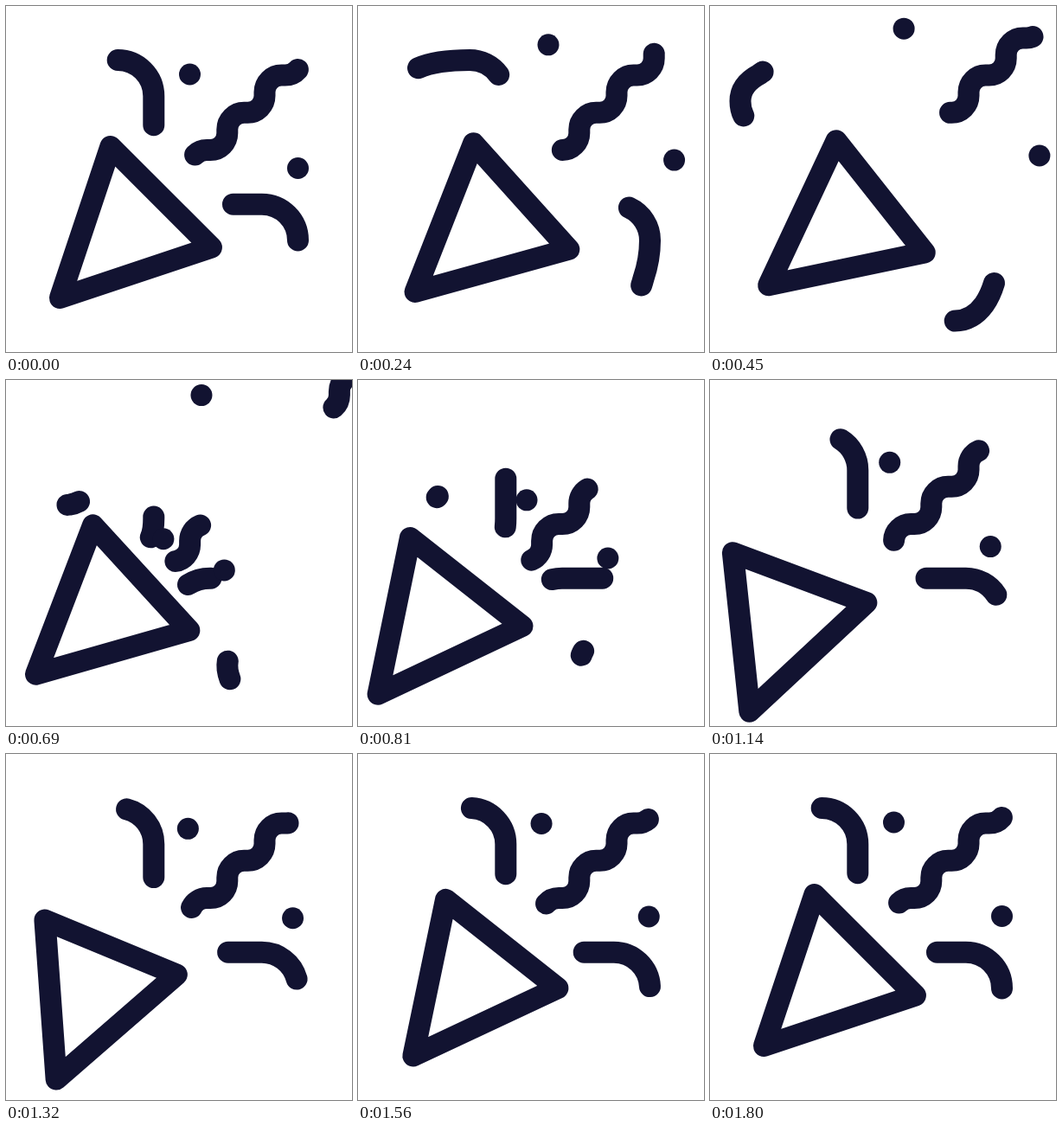
Write an HTML page that moves like this. It is 400x400 px and loops after 3.83 s.

```html
<!DOCTYPE html>
<html lang="en">
<head>
<meta charset="utf-8">
<title>Confetti popper</title>
<style>
  html, body { margin: 0; height: 100%; overflow: hidden; background: #fff; }
  svg { display: block; width: 100vw; height: 100vh; }
  path { fill: none; stroke: #121331; stroke-width: 25; stroke-linecap: round; stroke-linejoin: round; }
  circle { fill: #121331; }
</style>
</head>
<body>
<svg id="stage" viewBox="0 0 400 400">
  <path id="cone" d="M-19.4-97.2 97.2 19.4-77.8 77.8Z"/>
</svg>
<script>
const LOOP = 3830, STEP = 30, FIRE = 630, REST = 1800;
const stage = document.getElementById('stage');
const cone = document.getElementById('cone');

// Easing curves as cubic-bezier control points
const SMOOTH = [1 / 3, 0, 2 / 3, 1];
const GLIDE = [.33, .2, .53, 1];
const CATCH_UP = [1 / 3, 0, .59, 1];
const DART = [.1, .55, .18, 1];
const LAUNCH = [.1, .55, .24, 1];
const UNFURL = [.1, .55, .3, 1];
const TRAIL = [.1, .2, .24, 1];
const SLOW_TRAIL = [.2, 0, .24, 1];
const RETURN = [.59, 0, .48, 1];

const bezier = (u, a, b) => 3 * (1 - u) ** 2 * u * a + 3 * (1 - u) * u * u * b + u ** 3;

function ease(x, [x1, y1, x2, y2]) {
  let low = 0, high = 1;
  for (let i = 0; i < 20; i++) {
    const mid = (low + high) / 2;
    if (bezier(mid, x1, x2) < x) low = mid; else high = mid;
  }
  return bezier((low + high) / 2, y1, y2);
}

// Keys are [time, value, easing towards this key]
function track(t, ...keys) {
  if (t <= keys[0][0]) return keys[0][1];
  for (let i = 1; i < keys.length; i++) {
    const [t0, v0] = keys[i - 1], [t1, v1, curve = SMOOTH] = keys[i];
    if (t < t1) return v0 + (v1 - v0) * ease((t - t0) / (t1 - t0), curve);
  }
  return keys[keys.length - 1][1];
}

function add(tag, attributes) {
  const node = document.createElementNS('http://www.w3.org/2000/svg', tag);
  for (const name in attributes) node.setAttribute(name, attributes[name]);
  return stage.appendChild(node);
}

function trim(path, tail, head, width = 25) {
  path.style.display = head >= tail && width > 0 ? '' : 'none';
  path.style.strokeDasharray = `${Math.max(1, head - tail)} 9999`;
  path.style.strokeDashoffset = -tail;
  path.style.strokeWidth = width;
}

function place(dot, x, y, visible) {
  dot.setAttribute('cx', x);
  dot.setAttribute('cy', y);
  dot.style.display = visible ? '' : 'none';
}

// Each streamer flies out and curls away while a fresh one follows from the cone
const streamers = [
  {
    d: 'M167.3 181.8Q170.8 174 170.8 160V104.2A41.7 41.7 0 0 0 129.1 62.5' +
       'C100 62.5 74 66 57 79C42 87 35 98 35 110C35 120 38 128 44 134C52 142 62 146 74 144C82 143 90 138 94 132.5',
    tail: 44.5, head: 143.3, origin: -12, curled: 870
  },
  {
    d: 'M210.5 236.5Q222 229.2 236 229.2H295.8A41.7 41.7 0 0 1 337.5 270.9' +
       'C337.5 288 335 300 330 315C326 330 322 338 317 345C309 356 298 364 283 364' +
       'C270 362 262 356 259 346C256 338 255 331 256.5 324C258 318 260 313 264 309',
    tail: 53.3, head: 152, origin: -10, curled: 930
  }
];
for (const s of streamers) {
  s.leaving = add('path', { d: s.d });
  s.fresh = add('path', { d: s.d });
  s.end = s.leaving.getTotalLength() - 2;
}

const wave = 'M191 209.7' +
  'h2.1a19.5 19.5 0 0 0 19.5-19.5v-4.2a19.5 19.5 0 0 1 19.5-19.5h2.1'.repeat(7);
const waveLeaving = add('path', { d: wave });
const waveFresh = add('path', { d: wave });

const dots = [
  { from: [171, 221], rest: [212.5, 79], away: [226, 17.5], gone: 780 },
  { from: [222, 231.5], rest: [337.5, 187.5], away: [388, 170.6], gone: 600 }
];
for (const dot of dots) {
  dot.leaving = add('circle', { r: 12.5 });
  dot.fresh = add('circle', { r: 12.5 });
}

function draw(t) {
  const x = track(t, [0, 0], [450, 13.7], [930, -60.3, [.3, 0, .667, 1]], [REST, 0, RETURN]);
  const y = track(t, [0, 0], [450, -5.2], [930, 22, [.47, 0, .667, 1]], [REST, 0, RETURN]);
  const angle = track(t, [0, 0], [540, 7.2], [1080, -24.5, [.41, 0, .69, 1]],
    [1140, -24.5], [REST, 0, [.66, 0, .45, 1]]);
  cone.setAttribute('transform', `translate(${140.25 + x} ${259.7 + y}) rotate(${angle})`);

  for (const s of streamers) {
    trim(s.leaving,
      track(t, [0, s.tail], [s.curled, s.end, CATCH_UP]),
      track(t, [0, s.head], [s.curled, s.end, GLIDE]),
      track(t, [s.curled, 25], [s.curled + 210, 0]));
    trim(s.fresh,
      track(t, [690, 0], [REST, s.tail, TRAIL]),
      track(t, [FIRE, s.origin], [REST, s.head, UNFURL]));
  }

  trim(waveLeaving, 52.3 + 241 * (t / 690) ** 2.4, 226.4 + 60 * (t / 450) ** 1.8);
  trim(waveFresh,
    track(t, [690, 5], [REST, 52.3, SLOW_TRAIL]),
    track(t, [FIRE, 5], [REST, 226.4, LAUNCH]), t > FIRE ? 25 : 0);

  const drift = 1 - (1 - Math.min(1, t / 720)) ** 2;
  const dart = track(t, [FIRE, 0], [REST, 1, DART]);
  for (const { from, rest, away, gone, leaving, fresh } of dots) {
    const between = (a, b, k) => a.map((v, i) => v + (b[i] - v) * k);
    place(leaving, ...between(rest, away, drift), t < gone);
    place(fresh, ...between(from, rest, dart), t > FIRE);
  }
}

const start = performance.now();
function tick() {
  const t = (performance.now() - start) % LOOP;
  draw(Math.min(REST, Math.floor(t / STEP) * STEP));
  requestAnimationFrame(tick);
}
tick();
</script>
</body>
</html>
```
